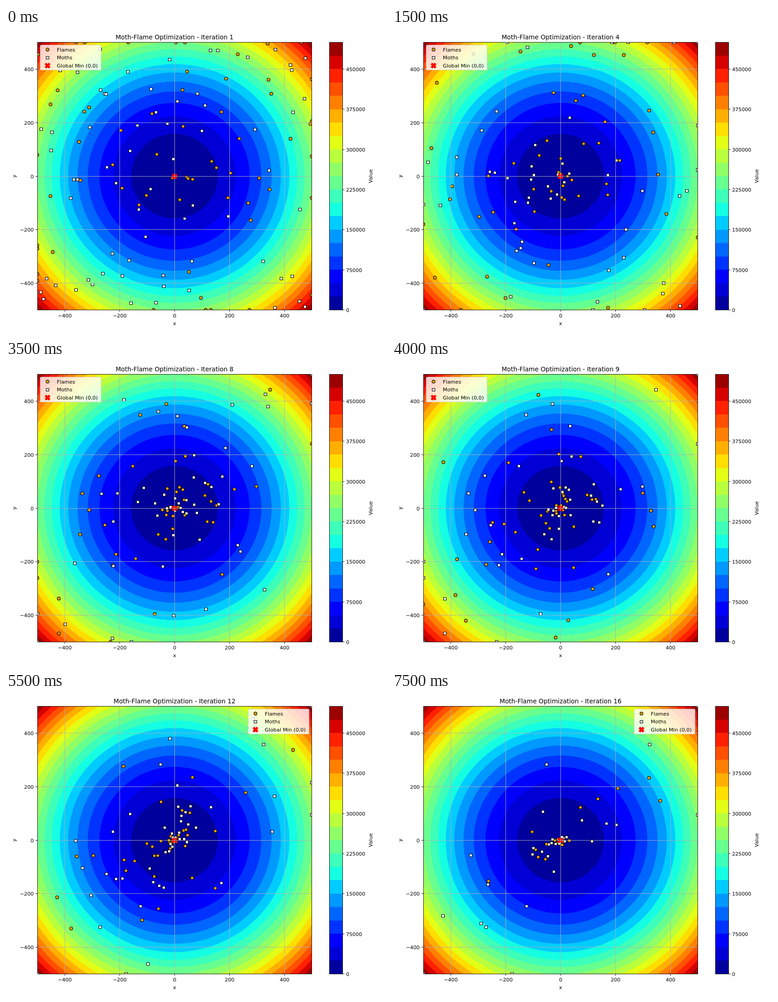
Write an HTML page with a canvas that moves like this. It is 837x669 px and loops after 8 s.

```html
<!DOCTYPE html>
<html lang="en">
<head>
<meta charset="utf-8">
<title>Moth-Flame Optimization</title>
<style>
  html, body { margin: 0; width: 100%; height: 100%; overflow: hidden; background: #fff; }
  canvas { display: block; }
</style>
</head>
<body>
<canvas id="stage" width="837" height="669"></canvas>
<script>
const STEP = 500, STEPS = 16;
const L = 69, T = 31.5, R = 673.5, B = 620.5;
const CX = (L + R) / 2, CY = (T + B) / 2;
const SX = (R - L) / 1000, SY = (B - T) / 1000;
const BANDS = 20, TOP = 500000;
const ctx = document.getElementById('stage').getContext('2d');

// Moths that stop moving: first iteration, x, y in data units.
const stuck = [
  [4, 500, 500], [4, -500, -500], [10, 324, 358], [10, 500, 94], [10, -177, -500],
  [12, -51, 283], [12, -271, -325], [12, -124, -247]
];

const clamp = (v, lo, hi) => Math.min(hi, Math.max(lo, v));
const px = x => CX + x * SX;
const py = y => CY - y * SY;
const crisp = v => Math.floor(v) + .5;

function random(seed) {
  let a = seed * 7919;
  return () => {
    a = (a + 0x6D2B79F5) | 0;
    let n = Math.imul(a ^ (a >>> 15), a | 1);
    n ^= n + Math.imul(n ^ (n >>> 7), n | 61);
    return ((n ^ (n >>> 14)) >>> 0) / 4294967296;
  };
}

// An even start, then a cloud along the rising diagonal that tightens with t.
function swarm(t) {
  const rnd = random(t + 4);
  if (t === 1) return Array.from({ length: 68 }, () => [rnd() * 1000 - 500, rnd() * 1000 - 500]);
  const n = t < 4 ? 64 : 54;
  const reach = 780 - 14 * t, wide = 1 - .035 * t;
  const pull = .5 + .15 * t + (t / 13) ** 7;
  return Array.from({ length: n }, (_, i) => {
    const r = reach * ((i + rnd()) / n) ** pull;
    const angle = rnd() * Math.PI * 2;
    const u = r * Math.cos(angle) * .75, v = r * Math.sin(angle) * .75 * wide;
    return [clamp(u - v, -500, 500), clamp(u + v, -500, 500)];
  });
}

const swarms = Array.from({ length: STEPS + 2 }, (_, t) => swarm(t));

function jet(v) {
  const ramp = (lo, hi) => clamp((v - lo) / (hi - lo), 0, 1);
  const r = ramp(.35, .66) - .5 * ramp(.89, 1);
  const g = ramp(.125, .375) - ramp(.64, .91);
  const b = .5 + .5 * ramp(0, .11) - ramp(.34, .65);
  return `rgb(${[r, g, b].map(c => Math.round(clamp(c, 0, 1) * 255))})`;
}

const bandColor = i => jet((i + .5) / BANDS);

function text(c, str, x, y, size = 11.1, align = 'center') {
  c.font = `${size}px "DejaVu Sans", sans-serif`;
  c.textAlign = align;
  c.fillStyle = '#000';
  c.fillText(str, x, y);
}

function upright(c, str, x, y) {
  c.save();
  c.translate(x, y);
  c.rotate(-Math.PI / 2);
  text(c, str, 0, 4);
  c.restore();
}

function line(c, x1, y1, x2, y2, color = '#000') {
  c.strokeStyle = color;
  c.lineWidth = .9;
  c.beginPath();
  c.moveTo(x1, y1);
  c.lineTo(x2, y2);
  c.stroke();
}

function frame(c, x1, x2) {
  c.strokeStyle = '#000';
  c.lineWidth = .9;
  c.strokeRect(crisp(x1), T, crisp(x2) - crisp(x1), B - T);
}

function clipAxes(c) {
  c.save();
  c.beginPath();
  c.rect(L, T, R - L, B - T);
  c.clip();
}

function paintBase(c) {
  c.fillStyle = '#fff';
  c.fillRect(0, 0, 837, 669);
  clipAxes(c);
  for (let i = BANDS - 1; i >= 0; i--) {
    const r = Math.sqrt((i + 1) * TOP / BANDS);
    c.fillStyle = bandColor(i);
    c.beginPath();
    c.ellipse(CX, CY, r * SX, r * SY, 0, 0, 7);
    c.fill();
  }
  c.restore();

  const edge = i => Math.round(B - i * (B - T) / BANDS);
  for (let i = 0; i < BANDS; i++) {
    c.fillStyle = bandColor(i);
    c.fillRect(712, edge(i + 1), 29.5, edge(i) - edge(i + 1));
  }
  frame(c, 712, 741);
  for (let v = 0; v < TOP; v += 75000) {
    const y = crisp(B - v / TOP * (B - T));
    line(c, 741.5, y, 745.5, y);
    text(c, v, 749, y + 4, 11.1, 'left');
  }
  for (let v = -400; v <= 400; v += 200) {
    const x = crisp(px(v)), y = crisp(py(v)), label = String(v).replace('-', '\u2212');
    line(c, x, B, x, B + 4);
    line(c, L - 4, y, L, y);
    text(c, label, x, 637);
    text(c, label, 61, y + 4, 11.1, 'right');
  }
  text(c, 'x', CX, 654);
  upright(c, 'y', 18, CY);
  upright(c, 'Value', 803, CY);
}

function outlined(c, fill) {
  c.fillStyle = fill;
  c.strokeStyle = '#000';
  c.lineWidth = 1.15;
  c.fill();
  c.stroke();
}

function flame(c, x, y) {
  c.beginPath();
  c.arc(x, y, 3.35, 0, 7);
  outlined(c, '#ffa500');
}

function moth(c, x, y) {
  c.beginPath();
  c.rect(crisp(x) - 3, crisp(y) - 3, 6, 6);
  outlined(c, '#fff');
}

function cross(c, x, y) {
  const q = 2.8;
  c.save();
  c.translate(x, y);
  c.beginPath();
  for (let k = 0; k < 4; k++) {
    c.lineTo(0, -q);
    c.lineTo(q, -2 * q);
    c.lineTo(2 * q, -q);
    c.rotate(Math.PI / 2);
  }
  c.closePath();
  c.fillStyle = c.strokeStyle = '#f00';
  c.lineWidth = 1.2;
  c.fill();
  c.stroke();
  c.restore();
}

function legend(c, x) {
  c.beginPath();
  c.roundRect(x, 37.5, 134, 55, 2.5);
  c.fillStyle = 'rgba(255,255,255,.8)';
  c.strokeStyle = 'rgba(204,204,204,.8)';
  c.lineWidth = 1.1;
  c.fill();
  c.stroke();
  [[flame, 'Flames'], [moth, 'Moths'], [cross, 'Global Min (0,0)']].forEach(([shape, name], i) => {
    const y = 47.5 + i * 17.6;
    shape(c, x + 16, y);
    text(c, name, x + 36.5, y + 4, 11.3, 'left');
  });
}

const base = document.createElement('canvas');
base.width = 837;
base.height = 669;
paintBase(base.getContext('2d'));

function draw(t) {
  ctx.drawImage(base, 0, 0);
  clipAxes(ctx);
  // This step's flames are the next step's moths.
  for (const [x, y] of swarms[t + 1]) flame(ctx, px(x), py(y));
  for (const [x, y] of swarms[t]) moth(ctx, px(x), py(y));
  for (const [from, x, y] of stuck) if (t >= from) moth(ctx, px(x), py(y));
  cross(ctx, CX, CY + .5);
  for (let v = -400; v <= 400; v += 200) {
    const x = crisp(px(v)), y = crisp(py(v));
    line(ctx, x, T, x, B, '#b0b0b0');
    line(ctx, L, y, R, y, '#b0b0b0');
  }
  ctx.restore();
  frame(ctx, L, R);
  legend(ctx, t < 10 ? 75.5 : 533.5);
  text(ctx, `Moth-Flame Optimization - Iteration ${t}`, CX, 24.5, 13.8);
}

let shown = 0;
function tick() {
  const t = Math.floor(performance.now() / STEP) % STEPS + 1;
  if (t !== shown) draw(shown = t);
  requestAnimationFrame(tick);
}
tick();
</script>
</body>
</html>
```
